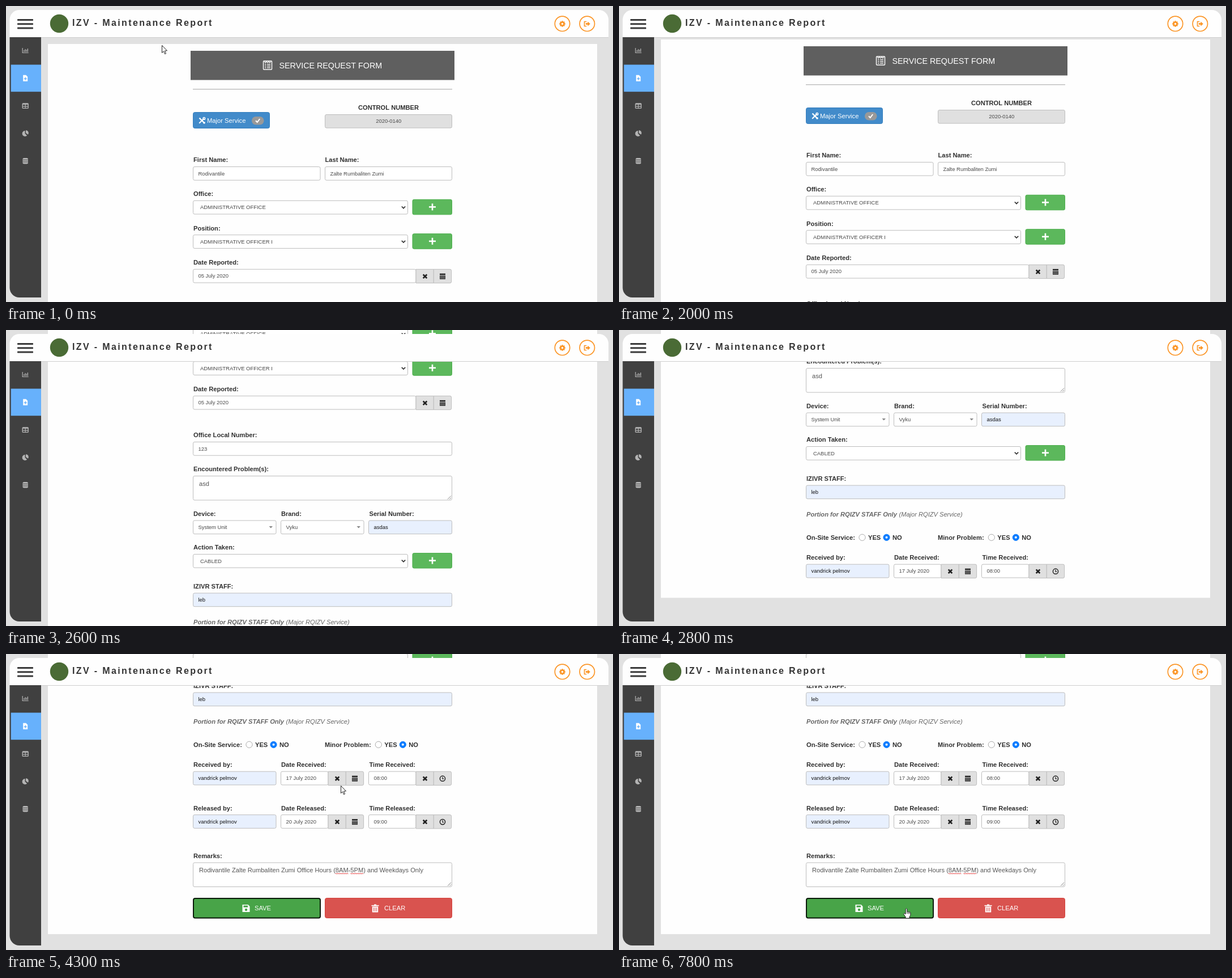
Animation, 1072 px wide and 522 px high, one loop 8000 ms. Source, as an HTML page with a canvas:

```html
<!DOCTYPE html>
<html lang="en">
<head>
<meta charset="utf-8">
<title>Maintenance Report</title>
<style>
html, body { margin: 0; width: 100%; height: 100%; overflow: hidden; background: #e1e1e1; }
canvas { display: block; }
</style>
</head>
<body>
<canvas id="stage" width="1072" height="522"></canvas>
<script>
const ctx = document.getElementById('stage').getContext('2d');
const LOOP = 8000, STEP = 100;
const FONT = '"Liberation Sans", Arial, sans-serif';
const SMALL = '9.45px ' + FONT;
const BODY = '11.1px ' + FONT;
const LABEL = 'bold 11.13px ' + FONT;
const GREY = '#e0e0e0', EDGE = '#bdbdbd', AUTOFILL = '#e8f0fe', INK = '#2f2f2f';

// ---- motion -------------------------------------------------------------
const SCROLL = [[1900, 0], [2100, 16], [2300, 63], [2800, 538], [3000, 612],
  [3200, 656.5], [3300, 656.5], [3500, 744]];

// The pointer is hidden over text fields, so it is shown in separate runs.
const RUNS = [
  { end: 1300, keys: [[0, 275, 69], [500, 529, 186], [600, 529, 186], [900, 610, 182], [1200, 686, 213]] },
  { end: 5600, keys: [[3900, 634, 226], [4100, 592, 231], [4200, 566, 228], [4300, 591, 232],
    [4500, 621, 221], [4600, 621, 221], [4700, 622, 221], [5000, 622, 221], [5100, 622, 220],
    [5200, 622, 220], [5300, 592, 224], [5400, 592, 224], [5500, 560, 222]] },
  { end: 6200, keys: [[5800, 550, 230], [6100, 540, 283]] },
  { end: 6900, keys: [[6700, 686, 272], [6800, 689, 290]] },
  { end: LOOP, keys: [[7100, 538, 412], [7200, 530, 424], [7400, 507, 452], [7500, 507, 452],
    [7600, 506, 451], [7800, 507, 448]] }
];

function track(keys, t) {
  if (t <= keys[0][0]) return keys[0].slice(1);
  const i = keys.findIndex(k => k[0] > t);
  if (i < 0) return keys[keys.length - 1].slice(1);
  const a = keys[i - 1], b = keys[i], f = (t - a[0]) / (b[0] - a[0]);
  return a.slice(1).map((v, n) => v + (b[n + 1] - v) * f);
}

// ---- drawing helpers ----------------------------------------------------
function rect(x, y, w, h, fill) {
  ctx.fillStyle = fill;
  ctx.fillRect(x, y, w, h);
}

function box(x, y, w, h, fill, edge, r = 2.5, line = 1) {
  ctx.beginPath();
  ctx.roundRect(x, y, w, h, r);
  ctx.fillStyle = fill;
  ctx.fill();
  if (!edge) return;
  ctx.lineWidth = line;
  ctx.strokeStyle = edge;
  ctx.stroke();
}

function disc(x, y, r, fill, edge, line = 1) {
  ctx.beginPath();
  ctx.arc(x, y, r, 0, Math.PI * 2);
  if (fill) { ctx.fillStyle = fill; ctx.fill(); }
  if (edge) { ctx.strokeStyle = edge; ctx.lineWidth = line; ctx.stroke(); }
}

function path(color, width, ...pts) {
  ctx.beginPath();
  for (let i = 0; i < pts.length; i += 2) ctx.lineTo(pts[i], pts[i + 1]);
  ctx.strokeStyle = color;
  ctx.lineWidth = width;
  ctx.stroke();
}

function shape(fill, ...pts) {
  ctx.beginPath();
  for (let i = 0; i < pts.length; i += 2) ctx.lineTo(pts[i], pts[i + 1]);
  ctx.closePath();
  ctx.fillStyle = fill;
  ctx.fill();
}

function text(s, x, y, font = SMALL, color = '#484848', align = 'left') {
  ctx.font = font;
  ctx.fillStyle = color;
  ctx.textAlign = align;
  ctx.fillText(s, x, y);
}

function at(x, y, draw) {
  ctx.save();
  ctx.translate(x, y);
  draw();
  ctx.restore();
}

// ---- icons, centred on 0,0 ----------------------------------------------
function crossIcon() {
  path('#222', 2.7, -3.3, -3.3, 3.3, 3.3);
  path('#222', 2.7, 3.3, -3.3, -3.3, 3.3);
}

function calendarIcon() {
  rect(-5, -5, 10, 2.5, '#222');
  rect(-5, -1.5, 10, 6.5, '#333');
  for (let i = 0; i < 4; i++)
    for (let j = 0; j < 2; j++) rect(-4 + i * 2.2, -0.5 + j * 2.6, 1.2, 1.3, '#bbb');
}

function clockIcon() {
  disc(0, 0, 4.6, null, '#222', 1.5);
  path('#222', 1.2, 0, -3, 0, 0.5, 2.2, 0.5);
}

function gearIcon(c) {
  for (let i = 0; i < 8; i++) {
    ctx.save();
    ctx.rotate(i * Math.PI / 4);
    rect(-1.2, -5.3, 2.4, 3, c);
    ctx.restore();
  }
  disc(0, 0, 2.9, null, c, 2.4);
}

function exitIcon(c) {
  path(c, 1.6, -1, -4, -4.8, -4, -4.8, 4, -1, 4);
  rect(-2.5, -1.4, 4, 2.8, c);
  shape(c, 1, -4, 5.5, 0, 1, 4);
}

function chartIcon(c) {
  path(c, 1.2, -5, -4.5, -5, 4, 5.5, 4);
  [3, 5, 4, 6].forEach((h, i) => rect(-3 + i * 2.2, 2.5 - h, 1.2, h, c));
}

function fileIcon(c) {
  shape(c, -4, -5.5, 1, -5.5, 4, -2.5, 4, 5.5, -4, 5.5);
  rect(-0.6, -1.5, 1.4, 5, '#67b1fc');
  rect(-2.4, 0.3, 5, 1.4, '#67b1fc');
}

function tableIcon(c) {
  box(-5, -4, 10, 8.5, 'transparent', c, 1, 1.4);
  rect(-5, -4, 10, 2, c);
  rect(-0.6, -4, 1.2, 8, c);
  rect(-5, 0.5, 10, 1.2, c);
}

function pieIcon(c) {
  ctx.beginPath();
  ctx.moveTo(-0.6, 0.4);
  ctx.arc(-0.6, 0.4, 5, Math.PI / 4, Math.PI * 1.5);
  ctx.fillStyle = c;
  ctx.fill();
  ctx.beginPath();
  ctx.moveTo(0.8, -0.6);
  ctx.arc(0.8, -0.6, 4.8, -Math.PI / 2, Math.PI / 5);
  ctx.fill();
}

function stackIcon(c) {
  box(-4.8, -5.2, 9.6, 10.4, c, null, 2.5);
  rect(-4.8, -2.2, 9.6, 0.9, '#404040');
  rect(-4.8, 1.2, 9.6, 0.9, '#404040');
}

function formIcon() {
  box(-7.5, -7.5, 15, 15, 'transparent', '#fff', 1, 1.4);
  path('#fff', 1.2, -6, -7, -4, -4.5, -2, -6.5, 0, -4.5, 2, -6.5, 4, -4.5, 6, -7);
  for (let i = 0; i < 3; i++) {
    rect(-5, -2.3 + i * 3, 2.4, 1.3, '#fff');
    rect(-1, -2.3 + i * 3, 6, 1.3, '#fff');
  }
}

function toolsIcon() {
  path('#fff', 2.4, -4.5, -4.5, 4.5, 4.5);
  path('#fff', 2, 3.5, -3.5, -4.8, 4.8);
  disc(3.8, -3.6, 1.8, null, '#fff', 1.5);
  disc(4, 4, 1.8, '#fff');
}

function saveIcon() {
  shape('#fff', -6.5, -6.5, 3.5, -6.5, 6.5, -3.5, 6.5, 6.5, -6.5, 6.5);
  rect(-4.5, -5, 7.5, 3.2, '#48a448');
  disc(0, 2.5, 2.2, '#48a448');
}

function trashIcon() {
  rect(-6.5, -5.6, 13, 1.7, '#fff');
  rect(-2, -7, 4, 1.6, '#fff');
  rect(-5.2, -3, 10.4, 10, '#fff');
  for (const x of [-3.1, -0.5, 2.1]) rect(x, -1.3, 1, 6.6, '#d9534f');
}

// ---- form parts ---------------------------------------------------------
const label = (s, x, y) => text(s, x, y, LABEL, INK);

function input(s, x, y, w, fill = '#fff') {
  box(x, y, w, 23.7, fill, EDGE);
  text(s, x + 9, y + 15, SMALL, fill === AUTOFILL ? '#111' : '#484848');
}

function select(s, y) {
  box(330.5, y, 379, 23.7, '#fff', EDGE);
  text(s, 343, y + 15);
  path('#333', 1.7, 698.8, y + 10.2, 702, y + 13.4, 705.2, y + 10.2);
  box(718, y - 2, 69.5, 26.5, '#5cb85c', '#4cae4c');
  rect(747, y + 9.8, 12, 2.6, '#fff');
  rect(751.7, y + 5.1, 2.6, 12, '#fff');
}

function dropdown(s, x, y) {
  input(s, x, y, 146.5);
  shape('#888', x + 134, y + 10, x + 140.5, y + 10, x + 137.2, y + 13.6);
}

function picker(s, x, y, w, icon) {
  input(s, x, y, w);
  const b = x + w;
  box(b, y, 31.3, 24.3, GREY, EDGE, 0);
  box(b + 31.3, y, 31.3, 24.3, GREY, EDGE, [0, 2.5, 2.5, 0]);
  at(b + 16, y + 12.5, crossIcon);
  at(b + 47, y + 12.5, icon);
}

function textarea(s, y) {
  box(330.5, y, 457, 42.5, '#fff', EDGE);
  text(s, 341, y + 17, BODY, '#555');
  path('#777', 0.9, 780, y + 41, 786, y + 35);
  path('#777', 0.9, 783.5, y + 41, 786, y + 38.5);
}

function squiggle(x, y, w) {
  ctx.beginPath();
  for (let i = 0; i <= w; i += 1.5) ctx.lineTo(x + i, y + (i / 1.5 % 2 ? 0.8 : -0.8));
  ctx.strokeStyle = '#e02020';
  ctx.lineWidth = 0.9;
  ctx.stroke();
}

function radio(x, y, on) {
  disc(x, y, 5.6, on ? '#0a7cff' : '#fff', on ? '#0a7cff' : '#aaa');
  if (on) disc(x, y, 2, '#fff');
}

function yesNo(s, x, rx, y) {
  label(s, x, y);
  radio(rx, y - 3.7, false);
  label('YES', rx + 10.5, y);
  radio(rx + 43, y - 3.7, true);
  label('NO', rx + 53.5, y);
}

function visit(kind, date, time, y) {
  label(kind + ' by:', 331, y);
  label('Date ' + kind + ':', 486, y);
  label('Time ' + kind + ':', 641.5, y);
  input('vandrick pelmov', 330.5, y + 8, 146.5, AUTOFILL);
  picker(date, 485.5, y + 8, 83.5, calendarIcon);
  picker(time, 640.5, y + 8, 83.5, clockIcon);
}

function topForm() {
  rect(326, 79, 466, 51.5, '#5f5f5f');
  at(462, 104.5, formIcon);
  text('SERVICE REQUEST FORM', 482.5, 109.6, '14.3px ' + FONT, '#fff');
  rect(330, 146, 458, 1.4, '#bcbcbc');

  box(330.5, 187.5, 135, 28, '#428bca', '#357ebd', 3);
  at(346, 202, toolsIcon);
  text('Major Service', 355, 206, '11.2px ' + FONT, '#fff');
  box(434, 195, 21.5, 14.5, '#999', null, 7.2);
  path('#fff', 2, 441, 202.3, 443.7, 205, 448.2, 199);

  text('CONTROL NUMBER', 675.5, 183, LABEL, INK, 'center');
  box(563.5, 191.5, 224, 23.5, GREY, EDGE);
  text('2020-0140', 675.7, 206, SMALL, '#484848', 'center');

  label('First Name:', 331, 275.3);
  input('Rodivantile', 330.5, 283.5, 224.5);
  label('Last Name:', 563.5, 275.3);
  input('Zalte Rumbaliten Zumi', 563.5, 283.5, 224);
  label('Office:', 331, 335.2);
  select('ADMINISTRATIVE OFFICE', 343.3);
  label('Position:', 331, 395.6);
  select('ADMINISTRATIVE OFFICER I', 403.7);
  label('Date Reported:', 331, 456);
  picker('05 July 2020', 330.5, 464.3, 393.5, calendarIcon);
  label('Office Local Number:', 331, 537.4);
  input('123', 330.5, 545.5, 457);
}

function lowForm() {
  label('Encountered Problem(s):', 331, 597);
  textarea('asd', 605.5);
  label('Device:', 331, 675.7);
  label('Brand:', 486, 675.7);
  label('Serial Number:', 641.5, 675.7);
  dropdown('System Unit', 330.5, 684);
  dropdown('Vyku', 485.5, 684);
  input('asdas', 640.5, 684, 147, AUTOFILL);
  label('Action Taken:', 331, 735.3);
  select('CABLED', 743.5);
  label('IZIVR STAFF:', 331, 804);
  input('leb', 330.5, 812, 457, AUTOFILL);
  text('Portion for RQIZV STAFF Only', 331, 867.3, 'italic ' + LABEL, '#666');
  text('(Major RQIZV Service)', 494.5, 867.3, 'italic ' + BODY, '#666');
  yesNo('On-Site Service:', 331, 429.5, 907.5);
  yesNo('Minor Problem:', 563, 657.8, 907.5);
  visit('Received', '17 July 2020', '08:00', 943.2);
  visit('Released', '20 July 2020', '09:00', 1019.6);

  label('Remarks:', 331, 1103.8);
  const lead = 'Rodivantile Zalte Rumbaliten Zumi Office Hours (';
  textarea(lead + '8AM-5PM) and Weekdays Only', 1112);
  const width = s => ctx.measureText(s).width;
  squiggle(341 + width(lead), 1131.3, width('8AM'));
  squiggle(341 + width(lead + '8AM-'), 1131.3, width('5PM'));

  box(331, 1175, 224, 34.5, '#48a448', '#0b1a0b', 3, 2);
  at(424, 1192.5, saveIcon);
  text('SAVE', 439, 1196.3, '11.2px ' + FONT, '#fff');
  box(563.5, 1174.5, 224, 35, '#d9534f', '#d43f3a', 3);
  at(652, 1192.5, trashIcon);
  text('CLEAR', 668, 1196.3, '11.2px ' + FONT, '#fff');
}

function page(t) {
  const y = track(SCROLL, t)[0];
  // Until the scroll slows, the lowest part of the page is not painted yet.
  const bottom = t < 2900 ? 1010.5 : 1238;
  ctx.save();
  ctx.translate(0, -y);
  ctx.beginPath();
  ctx.rect(74, 67, 970, bottom - 67);
  ctx.clip();
  rect(74, 67, 970, bottom - 67, '#fefefe');
  topForm();
  lowForm();
  ctx.restore();
}

function frame() {
  box(6.5, 7, 1057.5, 48, '#fefefe', null, [17, 17, 0, 0]);
  rect(6.5, 55, 1057.5, 1, '#cfcfcf');
  for (let i = 0; i < 3; i++) box(20, 23 + i * 7.3, 28, 3, '#3a3a3a', null, 0.8);
  disc(94, 31, 16.2, '#4a6b35');

  ctx.letterSpacing = '2.35px';
  text('IZV - Maintenance Report', 117, 35, 'bold 16.05px ' + FONT, '#333');
  ctx.letterSpacing = '0px';

  const orange = '#fb9526';
  disc(982.5, 31.3, 13.2, '#fff', orange, 1.7);
  at(982.5, 31.5, () => gearIcon(orange));
  disc(1026.3, 31.3, 13.2, '#fff', orange, 1.7);
  at(1026.3, 31.5, () => exitIcon(orange));

  box(6.5, 55, 55.5, 459, '#404040', null, [0, 0, 0, 17]);
  rect(8.7, 103.5, 53.3, 47.7, '#67b1fc');
  [chartIcon, fileIcon, tableIcon, pieIcon, stackIcon].forEach((icon, i) =>
    at(34.2, 78.5 + i * 48.7, () => icon(i === 1 ? '#fff' : '#b4b4b4')));
}

function arrow() {
  const pts = [0, 0, 0, 13, 3, 10.3, 5, 15.2, 7, 14.3, 5, 9.5, 9, 9.3];
  shape('#fff', ...pts);
  path('#222', 1, ...pts, 0, 0);
}

function hand() {
  ctx.beginPath();
  ctx.moveTo(-1.3, 10);
  ctx.lineTo(-1.3, 1.3);
  ctx.quadraticCurveTo(0, -0.6, 1.3, 1.3);
  ctx.lineTo(1.3, 6);
  for (let i = 0; i < 3; i++) {
    const x = 1.3 + i * 2;
    ctx.quadraticCurveTo(x + 1.2, 5 + i * 0.5, x + 2, 6.5 + i * 0.5);
  }
  ctx.lineTo(7.3, 12);
  ctx.lineTo(5.5, 15);
  ctx.lineTo(5.5, 17.5);
  ctx.lineTo(-1.3, 17.5);
  ctx.lineTo(-1.5, 15);
  ctx.lineTo(-5, 10);
  ctx.quadraticCurveTo(-4, 7.8, -1.3, 10);
  ctx.closePath();
  ctx.fillStyle = '#fff';
  ctx.fill();
  ctx.strokeStyle = '#222';
  ctx.lineWidth = 1;
  ctx.stroke();
  path('#222', 0.8, 1.3, 6, 1.3, 9.5);
  path('#222', 0.8, 3.3, 6.5, 3.3, 10);
  path('#222', 0.8, 5.3, 7, 5.3, 10);
}

function pointer(t) {
  const run = RUNS.find(r => t >= r.keys[0][0] && t < r.end);
  if (!run) return;
  const [x, y] = track(run.keys, t);
  at(Math.round(x) + 0.5, Math.round(y) + 0.5, y > 431 ? hand : arrow);
}

function tick(now) {
  const t = Math.floor(((now + 4) % LOOP) / STEP) * STEP;
  rect(0, 0, 1072, 522, '#e1e1e1');
  page(t);
  frame();
  pointer(t);
  requestAnimationFrame(tick);
}
requestAnimationFrame(tick);
</script>
</body>
</html>
```
